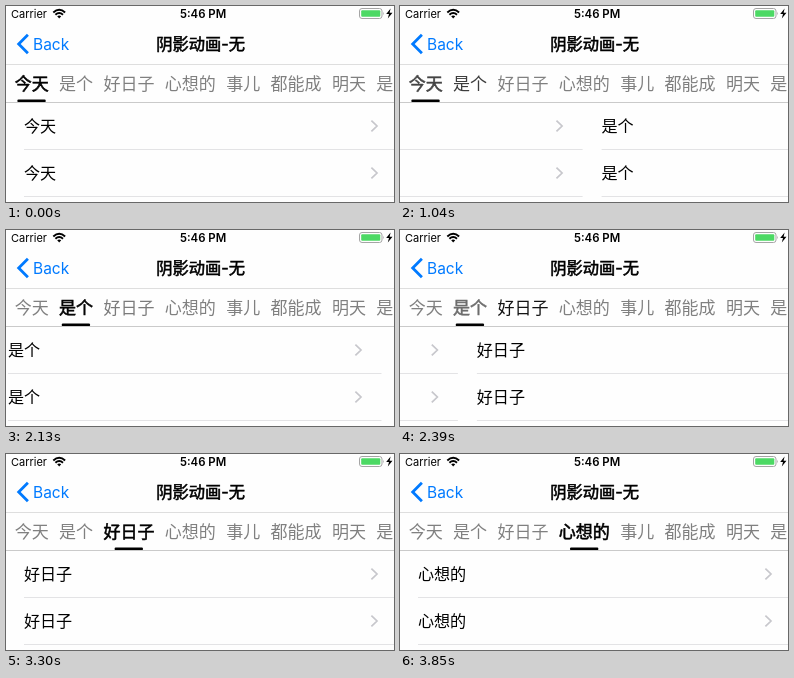
An HTML page that plays this animation: 388x196 px, repeating every 4.69 s.

```html
<!DOCTYPE html>
<html lang="zh-CN">
<head>
<meta charset="utf-8">
<title>Tabs</title>
<style>
html, body { margin: 0; width: 100%; height: 100%; overflow: hidden; background: #fefefe; }
svg { display: block; width: 388px; height: 196px; font-family: Inter, "Noto Sans CJK SC", "Noto Sans CJK", sans-serif; }
.line { fill: none; stroke-linecap: butt; stroke-linejoin: miter; }
.tab { font-size: 17.05px; }
.row { font-size: 16.1px; }
/* Semibold: heavier than regular, lighter than bold */
.heavy { stroke-width: .55px; }
</style>
</head>
<body>
<svg viewBox="0 0 388 196">
  <text x="5" y="12" font-size="11">Carrier</text>
  <g class="line" stroke="#000" stroke-width="2">
    <path d="M47.3 6.4Q53.2 1.2 59.1 6.4M49.4 8.7Q53.2 5.4 57 8.7"/>
  </g>
  <path d="M51.2 10.3Q53.2 8.7 55.2 10.3L53.2 12.4Z"/>
  <text x="197.1" y="12" font-size="11.4" font-weight="600" text-anchor="middle">5:46 PM</text>
  <rect x="353.5" y="2.5" width="22.5" height="10" rx="2.5" fill="none" stroke="#a5a5a5"/>
  <rect x="355.2" y="4.2" width="19.1" height="6.6" rx="1" fill="#4cd964"/>
  <path d="M377 5.8q1.5 1.7 0 3.4Z" fill="#a5a5a5"/>
  <path d="M384.6 2.6l-4.4 5.5h2.8l-1.2 4.5 4.7-5.8h-2.9Z"/>
  <path class="line" d="M21.9 28.8L12.7 38L21.9 47.2" stroke="#007aff" stroke-width="2.8"/>
  <text x="27" y="43.6" font-size="15.5" fill="#007aff">Back</text>
  <text class="heavy" x="194.6" y="44" font-size="16.3" stroke="#000" text-anchor="middle">阴影动画-无</text>
  <path class="line" d="M0 58.5H388" stroke="#dedede"/>
  <g id="tabs"></g>
  <path class="line" d="M0 96.5H388" stroke="#cacaca"/>
  <rect id="bar" y="93.6" width="28.4" height="2.5" rx="1.2"/>
  <g id="pages"></g>
</svg>
<script>
const LOOP = 4690, PAGE = 392.5, GRAY = 128;
const names = ['今天', '是个', '好日子', '心想的', '事儿', '都能成', '明天', '是个'];

// Each swipe: start and end in ms, time scale and steepness of the curve
const swipes = [
  [740, 1360, 332, 2.8],
  [2070, 2640, 243, 2.3],
  [3300, 3850, 219, 2.3],
];

const $ = id => document.getElementById(id);
function add(parent, tag, attrs, text = '') {
  const el = document.createElementNS('http://www.w3.org/2000/svg', tag);
  for (const k in attrs) el.setAttribute(k, attrs[k]);
  el.textContent = text;
  return parent.appendChild(el);
}

let left = 8.7;
const tabs = names.map(name => {
  const width = name.length * 17.05;
  const el = add($('tabs'), 'text', { class: 'tab heavy', x: left, y: 83.5 }, name);
  const tab = { el, center: left + width / 2 };
  left += width + 10.25;
  return tab;
});

names.slice(0, 4).forEach((name, i) => {
  const page = add($('pages'), 'g', { transform: `translate(${i * PAGE})` });
  for (const y of [120, 167]) {
    add(page, 'text', { class: 'row', x: 17.9, y: y + 6 }, name);
    add(page, 'path', { class: 'line', d: `M365.4 ${y - 5.4}l5.6 5.4l-5.6 5.4`, stroke: '#c7c7cc', 'stroke-width': 1.7 });
    add(page, 'path', { class: 'line', d: `M18 ${y + 23.5}H391.5`, stroke: '#e3e3e5' });
  }
});

function draw(now) {
  const t = now % LOOP;
  let current = 0, position = 0;
  for (const [start, end, scale, power] of swipes) {
    if (t >= end) position = ++current;
    else if (t > start) position += 1 - Math.exp(-(((t - start) / scale) ** power));
  }
  $('pages').setAttribute('transform', `translate(${-position * PAGE})`);
  $('bar').setAttribute('x', tabs[current].center - 14.4);
  tabs.forEach(({ el }, i) => {
    const shade = Math.round(GRAY * Math.min(1, Math.abs(i - position)));
    const color = `rgb(${shade},${shade},${shade})`;
    el.setAttribute('fill', color);
    el.setAttribute('stroke', i === current ? color : 'none');
  });
}

const origin = performance.now();
function tick() {
  draw(performance.now() - origin);
  requestAnimationFrame(tick);
}
tick();
</script>
</body>
</html>
```
